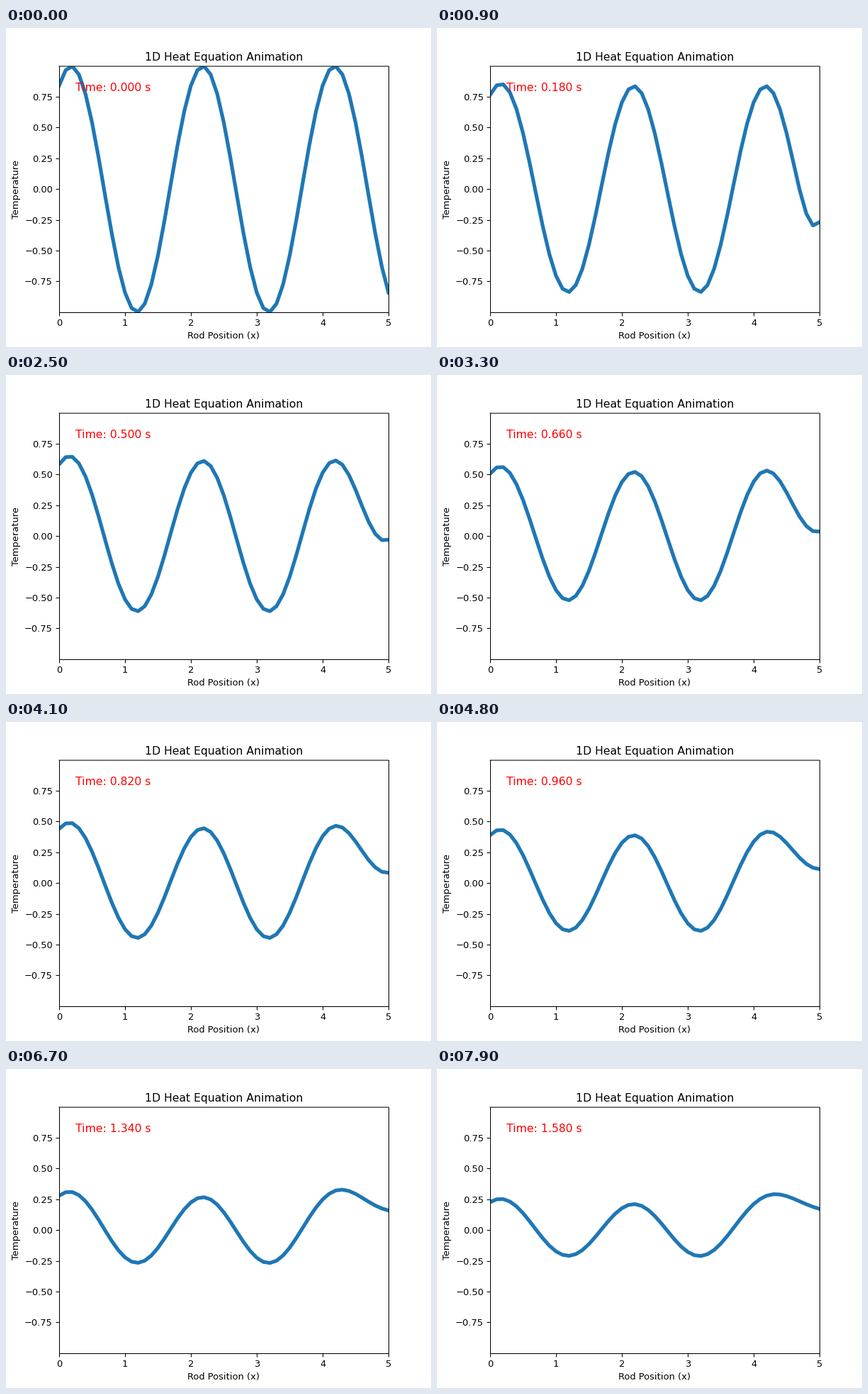
Animation of 600 by 450 pixels, one loop 8 s. Source, as a matplotlib script:

```python
import numpy as np
import matplotlib.pyplot as plt
from matplotlib.animation import FuncAnimation

FRAMES, INTERVAL = 80, 100
LENGTH, DX = 5.0, 0.1
DT, SUBSTEPS = 0.01, 2
ALPHA, LOSS = 0.1, 1.0

x = np.linspace(0, LENGTH, round(LENGTH / DX) + 1)


def step(u):
    """Explicit diffusion step with heat loss at both ends."""
    v = u.copy()
    v[1:-1] += ALPHA * DT / DX**2 * (u[2:] - 2 * u[1:-1] + u[:-2])
    v[0] = v[1] / (1 + LOSS * DX)
    v[-1] = v[-2] / (1 + LOSS * DX)
    return v


def solve():
    u = np.sin(np.pi * x + 1)
    history = [u]
    for _ in range(FRAMES - 1):
        for _ in range(SUBSTEPS):
            u = step(u)
        history.append(u)
    return history


history = solve()

plt.rcParams["font.family"] = "DejaVu Sans"
fig, ax = plt.subplots(figsize=(6.4, 4.8), dpi=93.75)  # 600 x 450 px
line, = ax.plot(x, history[0], lw=4, color="tab:blue")
clock = ax.text(0.05, 0.9, "", transform=ax.transAxes, fontsize=12, color="red")
ax.set_xlim(0, LENGTH)
ax.set_ylim(history[0].min(), history[0].max())
ax.set_xlabel("Rod Position (x)")
ax.set_ylabel("Temperature")
ax.set_title("1D Heat Equation Animation")
ax.spines["top"].set_snap(False)


def update(i):
    line.set_ydata(history[i])
    clock.set_text(f"Time: {i * SUBSTEPS * DT:.3f} s")
    return line, clock


anim = FuncAnimation(fig, update, frames=FRAMES, interval=INTERVAL,
                     repeat=True, repeat_delay=0)
plt.show()
```
